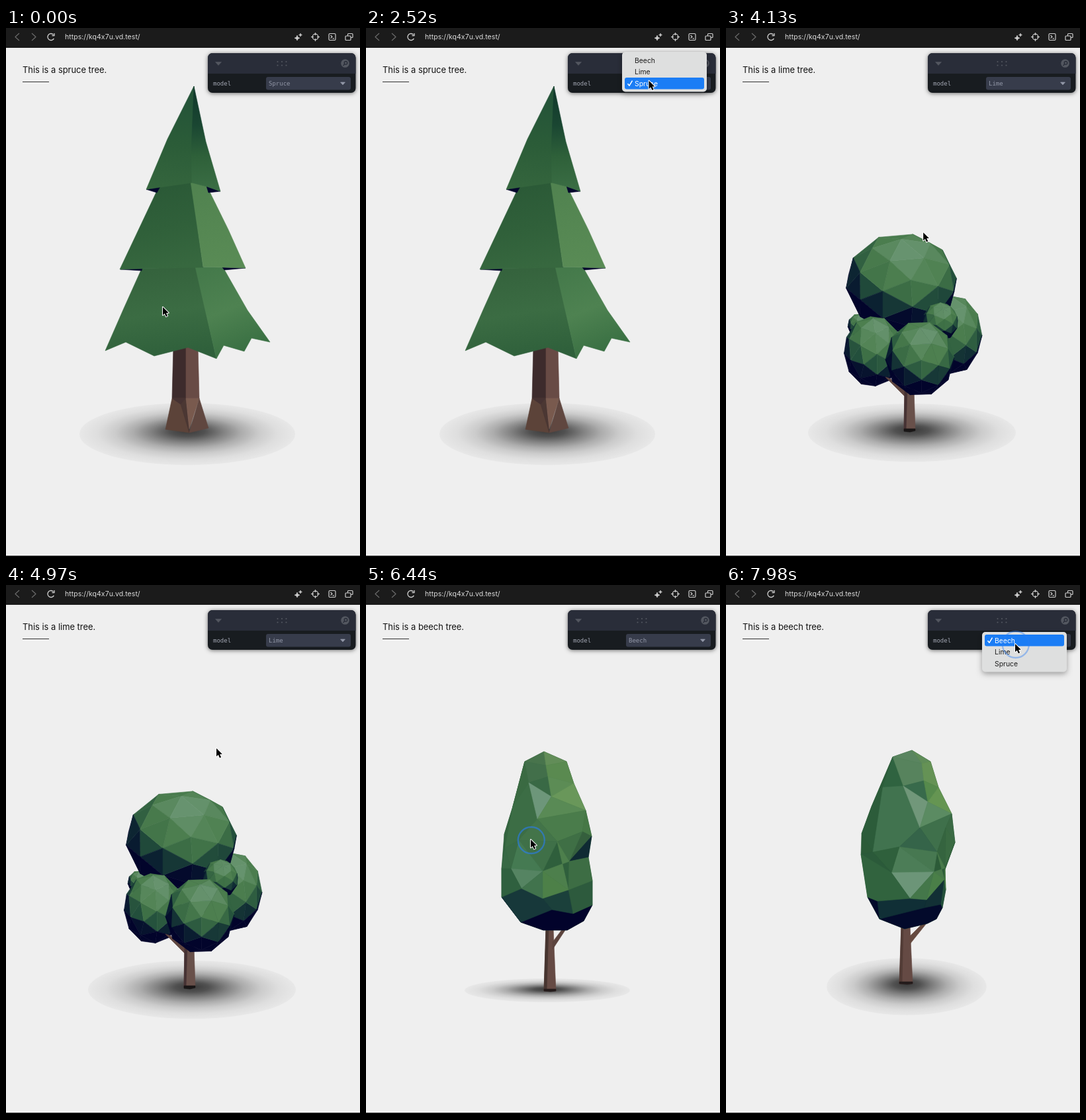
An HTML page with a canvas for the animation above (8 s loop, 535x800 px).

```html
<!DOCTYPE html>
<html lang="en">
<meta charset="utf-8">
<title>Tree viewer</title>
<style>
html, body { margin: 0; width: 535px; height: 800px; overflow: hidden; background: #efefef }
canvas { display: block }
</style>
<canvas id="stage" width="535" height="800"></canvas>
<script>
const ctx = document.getElementById('stage').getContext('2d');
const LOOP = 8000;
const clamp = v => Math.max(0, Math.min(1, v));
const mix = (a, b, k) => a + (b - a) * k;
const smooth = k => k * k * (3 - 2 * k);
const within = (t, spans) => spans.find(([from, to]) => t >= from && t < to);

// Eased values between rows of [time, ...values]
function track(rows, t) {
  const i = rows.findIndex(r => r[0] > t);
  if (i < 0) return rows.at(-1).slice(1);
  if (i === 0) return rows[0].slice(1);
  const a = rows[i - 1], b = rows[i], k = smooth((t - a[0]) / (b[0] - a[0]));
  return a.slice(1).map((v, j) => mix(v, b[j + 1], k));
}

// ---------- drawing helpers ----------
function trace(points) {
  ctx.beginPath();
  points.forEach(([x, y]) => ctx.lineTo(x, y));
}
function poly(fill, points) {
  trace(points);
  ctx.closePath();
  ctx.fillStyle = ctx.strokeStyle = fill;
  ctx.lineWidth = 0.6;
  ctx.lineJoin = 'round';
  ctx.fill();
  ctx.stroke();
}
const shape = (fill, text) => poly(fill, text.split(' ').map(p => p.split(',').map(Number)));
function line(text, color, width = 1.2) {
  trace(text.split(' ').map(p => p.split(',').map(Number)));
  ctx.strokeStyle = color;
  ctx.lineWidth = width;
  ctx.stroke();
}
function box(x, y, w, h, r, fill) {
  ctx.beginPath();
  ctx.roundRect(x, y, w, h, r);
  ctx.fillStyle = fill;
  ctx.fill();
}
function ring(x, y, r, color, width = 1.2, from = 0, to = 7) {
  ctx.beginPath();
  ctx.arc(x, y, r, from, to);
  ctx.strokeStyle = color;
  ctx.lineWidth = width;
  ctx.stroke();
}
function disc(x, y, r, fill) {
  ctx.beginPath();
  ctx.arc(x, y, r, 0, 7);
  ctx.fillStyle = fill;
  ctx.fill();
}
function label(text, x, y, font, color) {
  ctx.font = font;
  ctx.fillStyle = color;
  ctx.fillText(text, x, y);
}
function gradient(x0, y0, x1, y1, ...colors) {
  const g = ctx.createLinearGradient(x0, y0, x1, y1);
  colors.forEach((c, i) => g.addColorStop(i / (colors.length - 1), c));
  return g;
}
function groundShadow(x, y, rx, ry) {
  if (ry < 0.5) return;
  const g = ctx.createRadialGradient(0, -0.1, 0, 0, 0, 1);
  [0.76, 0.66, 0.46, 0.28, 0.15, 0.07, 0.03].forEach((a, i) => g.addColorStop(i / 6, `rgba(0,0,0,${a})`));
  ctx.save();
  ctx.translate(x, y);
  ctx.scale(rx, ry);
  disc(0, 0, 1, g);
  ctx.restore();
}

// ---------- spruce ----------
function drawSpruce() {
  groundShadow(274, 614, 163, 47);
  shape('#3d2b2c', '253,480 273,480 272,562 251,560');
  shape('#684b45', '272,480 290,480 292,560 272,560');
  shape('#5c4339', '251,560 272,560 277,612 241,607');
  shape('#463232', '251,560 272,560 264,569');
  shape('#4b3733', '272,560 264,569 277,612');
  shape('#795a4e', '272,560 292,560 277,606');
  shape('#604740', '292,560 306,605 277,612');

  shape(gradient(230, 366, 250, 495, '#35633d', '#3b6c43', '#2f603b'),
    '205,364 287,361 318,500 275,483 224,496 181,475 150,488 178,424');
  shape(gradient(300, 370, 350, 490, '#457a4b', '#4e8251', '#3a7043'),
    '286,361 328,362 365,427 399,475 371,469 360,489 329,480 318,500');
  shape('#04062c', '173,365 206,363 205,367');
  shape('#04062c', '327,362 362,363 330,366');
  shape(gradient(225, 245, 250, 364, '#2b5a37', '#30603a', '#37683f'),
    '231,240 280,232 298,362 205,364 172,365');
  shape(gradient(290, 240, 320, 362, '#518350', '#598b55'), '279,232 304,240 336,305 362,363 298,361');
  shape('#04062c', '212,244 233,240 228,249');
  shape('#04062c', '303,239 324,247 306,249');
  shape(gradient(265, 110, 255, 242, '#245438', '#2b5c38', '#34653d'),
    '284,88 244,168 212,244 232,241 281,234 284,160');
  shape(gradient(288, 100, 292, 240, '#123a2c', '#1a4632', '#2e6039', '#396c43'),
    '284,88 302,172 324,247 304,240 281,234 280,185');
}

// ---------- lime ----------
const PHI = (1 + Math.sqrt(5)) / 2;
const add = (a, b) => a.map((v, i) => v + b[i]);
const unit = v => v.map(c => c / Math.hypot(...v));
function icosphere() {
  const verts = [], faces = [];
  for (const s of [-1, 1]) for (const p of [-PHI, PHI]) verts.push([0, s, p], [s, p, 0], [p, 0, s]);
  const near = (a, b) => Math.abs(Math.hypot(...a.map((v, i) => v - b[i])) - 2) < 0.01;
  verts.forEach((a, i) => verts.forEach((b, j) => verts.forEach((c, k) => {
    if (!(i < j && j < k && near(a, b) && near(b, c) && near(a, c))) return;
    const [ab, bc, ca] = [add(a, b), add(b, c), add(c, a)];
    faces.push(...[[a, ab, ca], [b, bc, ab], [c, ca, bc], [ab, bc, ca]].map(f => f.map(unit)));
  })));
  return faces;
}
const SPHERE = icosphere();
const LIGHT = unit([0.2, -0.65, 0.72]);
const RAMP = [[2, 4, 43], [12, 36, 50], [36, 80, 60], [62, 112, 70], [78, 128, 80], [104, 148, 112]];
function leafColor(brightness) {
  const p = clamp(brightness) * (RAMP.length - 1), i = Math.min(RAMP.length - 2, Math.floor(p));
  return `rgb(${RAMP[i].map((v, j) => Math.round(mix(v, RAMP[i + 1][j], p - i)))})`;
}
function turn([x, y, z], yaw, pitch) {
  const u = x * Math.cos(yaw) + z * Math.sin(yaw), w = z * Math.cos(yaw) - x * Math.sin(yaw);
  return [u, y * Math.cos(pitch) + w * Math.sin(pitch), w * Math.cos(pitch) - y * Math.sin(pitch)];
}
function ball(cx, cy, rx, ry, yaw, pitch) {
  for (const face of SPHERE) {
    const f = face.map(v => turn(v, yaw, pitch));
    const n = unit(f.reduce(add));
    if (n[2] < -0.05) continue;
    const d = n.reduce((sum, v, i) => sum + v * LIGHT[i], 0);
    poly(leafColor(d), f.map(([x, y]) => [cx + x * rx, cy + y * ry]));
  }
}
function drawLime() {
  groundShadow(281, 612, 157, 44);
  ball(340, 464, 47, 61, 0.5, 0.3);
  ball(201, 450, 17, 18, 0.2, 0.5);
  ball(265, 386, 85, 76, 0.2, 0.5);
  ball(324, 444, 27, 29, 0.8, 0.2);
  ball(222, 489, 44, 54, 0.7, 0.4);
  shape('#5f4640', '241,528 248,530 272,549 271,558');
  shape('#68504a', '270,545 284,545 286,608 269,608');
  shape('#453233', '270,545 274,545 272,608 269,608');
  shape('#191616', '269,606 286,606 286,609 278,611 269,610');
  ball(293, 500, 52, 57, 0.05, 0.6);
}

// ---------- beech: points as [x, y] in the first view, then in the turned view ----------
const OUTLINE = {
  a: [269, 252, 281, 250], b: [240, 267, 252, 260], Z: [222, 335, 220, 335], P: [209, 377, 205, 376],
  w: [205, 429, 204, 407], A: [205, 472, 214, 472], G: [234, 510, 232, 505], F: [268, 522, 270, 520],
  E: [304, 522, 304, 512], D: [329, 508, 318, 505], C: [342, 484, 327, 488], t: [342, 447, 332, 461],
  s: [336, 412, 331, 430], q: [341, 380, 346, 389], k: [332, 341, 341, 346], g: [314, 300, 321, 306],
  c: [303, 267, 309, 267]
};
const INNER = {
  d: [272, 273, 296, 270], e: [246, 299, 268, 304], f: [275, 290, 299, 296], h: [280, 320, 305, 328],
  l: [259, 354, 293, 367], N: [222, 335, 237, 306], n: [210, 398, 222, 404], p: [231, 386, 262, 396],
  o: [289, 388, 319, 404], M: [327, 373, 332, 367], r: [307, 418, 331, 428], u: [267, 433, 314, 434],
  v: [219, 429, 250, 435], x: [235, 459, 278, 474], y: [267, 474, 303, 476], z: [306, 461, 330, 445],
  O: [205, 472, 229, 478], H: [281, 491, 300, 488], I: [313, 497, 325, 483]
};
const TRUNK = {
  1: [272, 518, 265, 514], 2: [283, 518, 278, 514], 3: [287, 614, 282, 603], 4: [269, 614, 262, 603],
  5: [276, 518, 268, 514], 6: [273, 614, 266, 603], 7: [282, 540, 278, 531], 8: [300, 516, 296, 513],
  9: [305, 516, 302, 513], 0: [282, 551, 278, 543]
};
const POINTS = { ...OUTLINE, ...INNER, ...TRUNK };
// Corners, colour in the first view, colour in the turned view
const FACETS = `1234 654a44 654a44|1564 46342f 523c36|7890 5c443e 65493f
${Object.keys(OUTLINE).join('')} 2f5f3c 2c5b38|AOxyzICDEFG 02032b 030a2b|OxyHG 17383a 102f36
yzIH 1b403b 123035|ztCI 2d5a3d 24503b|bNnPZ 34643f 2c5c3a|beN 3a6a42 2f6340|elpnN 3c6d45 41734f
abd 48744c 5a8560|adc 628d58 5f8c58|befd 426f4a 57835d|dfgc 5a8a50 659255|efh 396945 386a4b
fgh 5c8c55 568a4c|ehl 6d967a 71977a|hgk 69975a 659552|hkl 598a55 5b8b62|lkMo 4a7c4b 3f704b
lop 437449 356449|kMq 467846 3a6944|Mqr 355f3d 3a6a42|qrs 0f2a33 2c5b38|oMr 3f6f45 35643f
pou 3f7048 477851|puv 457a52 4c7d57|npv 3a6a45 2f603c|vux 558462 6c9578|oruz 4d7f4c 48794a
rstz 3d6d44 44773f|uzy 4d8048 4a7f48|uyx 41734d 44774a|nwv 386945 2b5a3a|wvxOA 2f603f 31633e`
  .split(/[|\n]/).map(row => row.split(' '));
const blend = (a, b, k) => 'rgb(' + [0, 2, 4].map(i =>
  Math.round(mix(parseInt(a.substr(i, 2), 16), parseInt(b.substr(i, 2), 16), k))) + ')';

// Vertical shift of a point when the camera drops to ground level
function tilt(x, y) {
  const v = (y - 252) / 270;
  if (v > 1) return 12 * (v - 1);
  const front = Math.sqrt(Math.max(0, 1 - ((x - 272) / 70) ** 2));
  return 5 * (1 - v) - 15 * front * Math.sin(Math.PI * clamp(v));
}
function drawBeech(t) {
  const [height, turned] = track([[5560, 2.4, 0], [5740, 0, 0], [6440, 1, 0], [7000, 2.4, 1]], t);
  groundShadow(274 - turned, 617 - 4 * height, 128 - 3 * height, 18 * height);
  const place = key => {
    const [x0, y0, x1, y1] = POINTS[key];
    return [mix(x0, x1, turned), mix(y0 + (1 - height) * tilt(x0, y0), y1, turned)];
  };
  for (const [keys, first, second] of FACETS) poly(blend(first, second, turned), [...keys].map(place));
  const [l, r] = [place('4'), place('3')];
  if (height > 0.5) poly('#241b1b', [[l[0], l[1] - 3], [r[0], r[1] - 3], r, [r[0] - 8, r[1] + 1], l]);
}

// ---------- interface ----------
const INTER = 'Inter, sans-serif', MONO = '9px "DejaVu Sans Mono", monospace';
const MODELS = ['Beech', 'Lime', 'Spruce'];

function drawBrowserBar() {
  const light = '#cfcfcf';
  box(0, 0, 535, 30, 0, '#1b1b1b');
  box(0, 798, 535, 2, 0, '#151515');
  line('20,8 14,13.5 20,19', '#6b6b6b');
  line('39,8 45,13.5 39,19', '#6b6b6b');
  ring(68, 13.5, 5, light, 1.3, 0.5, 5.5);
  line('73,8 73,11.5 69.5,11.5', light, 1.3);
  label('https://kq4x7u.vd.test/', 89, 17.3, '10.6px ' + INTER, '#dadada');
  shape(light, '440,11 441.2,14 444,15.2 441.2,16.4 440,19 438.8,16.4 436,15.2 438.8,14');
  shape(light, '445,8 445.7,9.8 447.5,10.5 445.7,11.2 445,13 444.3,11.2 442.5,10.5 444.3,9.8');
  ring(467.5, 13.5, 4.3, light);
  for (const p of ['467.5,7 467.5,11', '467.5,16 467.5,20', '461,13.5 465,13.5', '470,13.5 474,13.5']) line(p, light);
  ctx.lineWidth = 1.2;
  ctx.beginPath();
  ctx.roundRect(488, 8.5, 10, 10, 1.5);
  ctx.roundRect(516.5, 8.5, 7.5, 6, 1);
  ctx.stroke();
  line('490.5,11 493,13.3 490.5,15.6', light);
  line('493.5,16 496,16', light);
  box(513, 12, 8, 6.5, 1, '#1b1b1b');
  ctx.beginPath();
  ctx.roundRect(513, 12, 8, 6.5, 1);
  ctx.stroke();
}
function withShadow(color, blur, y, draw) {
  ctx.save();
  ctx.shadowColor = color;
  ctx.shadowBlur = blur;
  ctx.shadowOffsetY = y;
  draw();
  ctx.restore();
}
function drawPanel(model) {
  const dim = '#535760';
  withShadow('rgba(0,0,0,.55)', 6, 1, () => box(305, 38, 223.5, 60, 7, '#181c20'));
  box(305, 38, 223.5, 31, [7, 7, 0, 0], '#292d39');
  shape(dim, '316.5,51.5 325.5,51.5 321,56.5');
  for (const x of [410.5, 417, 423.5]) for (const y of [51, 56.5]) disc(x, y, 1.1, dim);
  disc(512.5, 53.5, 6.3, dim);
  ring(513.5, 52.8, 2.3, '#292d39', 1.3);
  line('511.8,54.5 509.5,57', '#292d39', 1.3);
  label('model', 313, 87, MONO, '#a3a7b3');
  box(393, 74, 128, 19.5, 3, '#373c4b');
  label(model, 397, 87, MONO, '#9398a8');
  shape('#9398a8', '505.5,82 512.5,82 509,86');
}
function drawMenu(selected, pointerY) {
  const top = 71 - selected * 17.5;
  withShadow('rgba(0,0,0,.35)', 9, 3, () => box(387, top, 128, 60.5, 5, '#dedfdf'));
  const hovered = Math.max(0, Math.min(2, Math.floor((pointerY - top - 4) / 17.5)));
  box(391, top + 4 + hovered * 17.5, 120, 17.5, 3, '#1b7df5');
  MODELS.forEach((name, i) => {
    const y = top + 16.7 + i * 17.5, color = i === hovered ? '#fff' : '#1d1d1d';
    label(name, 406, y, '10.4px ' + INTER, color);
    if (i === selected) line(`395.5,${y - 3.5} 398,${y - 0.5} 402.5,${y - 8}`, color, 1.5);
  });
}
function drawPointer(x, y) {
  ctx.save();
  ctx.translate(x, y);
  trace([[0, 0], [0, 12.2], [2.8, 9.7], [4.9, 14.4], [7.1, 13.4], [5.1, 8.9], [8.8, 8.7]]);
  ctx.closePath();
  ctx.strokeStyle = '#fff';
  ctx.lineWidth = 2;
  ctx.stroke();
  ctx.fillStyle = '#000';
  ctx.fill();
  ctx.restore();
}

// ---------- timeline ----------
const POINTER = [
  [0, 237, 422], [700, 238, 418], [840, 245, 352], [980, 425, 97], [1540, 433, 93], [2000, 434, 88],
  [3100, 420, 70], [3290, 420, 71], [3800, 300, 300], [4500, 296, 320], [4970, 318, 247], [5120, 430, 88],
  [5320, 425, 68], [5560, 216, 345], [5740, 218, 308], [6440, 249, 385], [6950, 266, 425], [7250, 275, 425],
  [7700, 430, 95], [7980, 437, 89]
];
const PRESSES = [[5560, 7100], [7880, LOOP]];
const MENUS = [[2000, 3260], [5140, 5330], [7910, LOOP]];

function draw(t) {
  const current = t < 3330 ? 2 : t < 5330 ? 1 : 0;
  const name = MODELS[current];
  const [x, y] = track(POINTER, t);
  ctx.fillStyle = '#efefef';
  ctx.fillRect(0, 0, 535, 800);
  [drawBeech, drawLime, drawSpruce][current](t);
  label(`This is a ${name.toLowerCase()} tree.`, 25, 68, '12.9px ' + INTER, '#111');
  box(25, 81, 40, 1, 0, '#333');
  drawBrowserBar();
  drawPanel(name);
  if (within(t, MENUS)) drawMenu(current, y);
  const press = within(t, PRESSES);
  if (press) ring(x + 0.8, y + 1, 20, `rgba(40,125,245,${0.6 * clamp((t - press[0]) / 150)})`, 2.3);
  drawPointer(x, y);
}
function tick() {
  draw(performance.now() % LOOP);
  requestAnimationFrame(tick);
}
tick();
</script>
</html>
```
